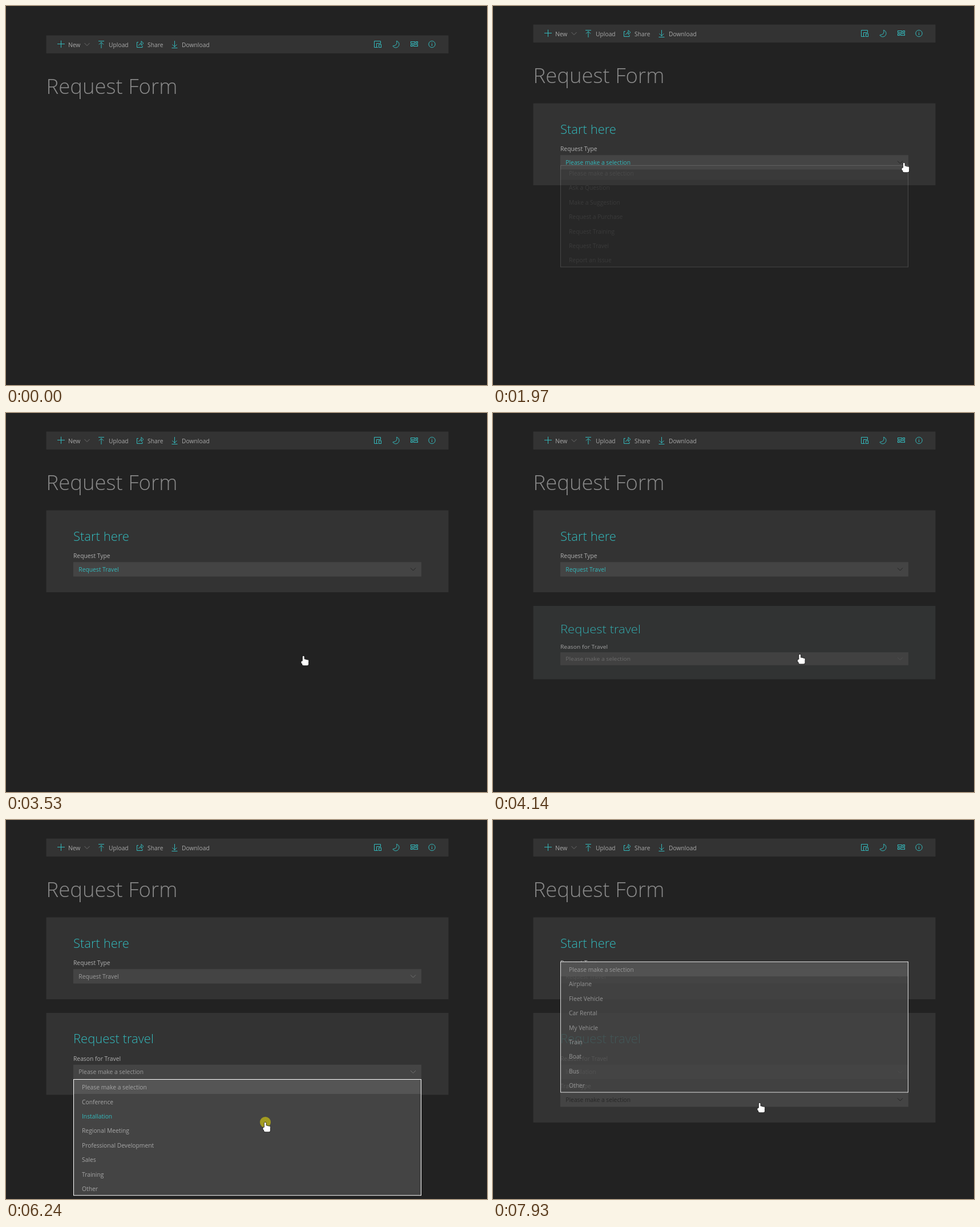
These frames come from a looping animation (843 px wide and 664 px high, 8000 ms). An HTML page with a canvas:

```html
<!DOCTYPE html>
<html lang="en">
<head>
<meta charset="utf-8">
<title>Request Form</title>
<style>
html, body { margin: 0; width: 843px; height: 664px; overflow: hidden; background: #222; }
canvas { display: block; }
</style>
</head>
<body>
<canvas id="stage" width="843" height="664"></canvas>
<script>
const ctx = document.getElementById('stage').getContext('2d');
const LOOP = 8000, ROW = 25.4, LEFT = 118, WIDTH = 610, FIELD_HEIGHT = 25.3;
const TEAL = '#33b9bc', LABEL = '#b0b0b0';
const FONT = '"Open Sans", "Noto Sans", sans-serif';
const PROMPT = 'Please make a selection';

// Each visit: the pointer travels to x, y, presses and releases.
// Visits alternate between opening a menu and choosing from it.
const visits = [
  { from: 940, to: 1570, press: 1740, release: 1960, x: 720.5, y: 274.5 },
  { from: 2130, to: 2820, press: 3280, release: 3450, x: 521.5, y: 425.5 },
  { from: 3690, to: 4450, press: 4530, release: 4740, x: 542, y: 436.5 },
  { from: 5270, to: 5770, press: 6240, release: 6470, x: 454.5, y: 529.5 },
  { from: 7100, to: 7470, press: 7620, release: 7840, x: 467.5, y: 495.5 }
];
const menus = [
  { top: 287, slide: -9, items: [PROMPT, 'Ask a Question', 'Make a Suggestion',
    'Request a Purchase', 'Request Training', 'Request Travel', 'Report an Issue'] },
  { top: 454.5, slide: -9, items: [PROMPT, 'Conference', 'Installation', 'Regional Meeting',
    'Professional Development', 'Sales', 'Training', 'Other'] },
  { top: 247, slide: 9, items: [PROMPT, 'Airplane', 'Fleet Vehicle', 'Car Rental',
    'My Vehicle', 'Train', 'Boat', 'Bus', 'Other'] }
];

const clamp = v => Math.max(0, Math.min(1, v));
const progress = (t, start, length) => clamp((t - start) / length);
const easeOut = v => 1 - (1 - v) ** 3;
const between = (t, a, b) => t >= a && t < b;

function text(str, x, y, size, color, weight = 400) {
  ctx.font = `${weight} ${size}px ${FONT}`;
  ctx.fillStyle = color;
  ctx.fillText(str, x, y);
}

function box(x, y, w, h, color) {
  ctx.fillStyle = color;
  ctx.fillRect(x, y, w, h);
}

// Runs drawing code with the origin moved to x, y
function at(x, y, paint) {
  ctx.save();
  ctx.translate(x, y);
  paint();
  ctx.restore();
}

function line(...points) {
  ctx.beginPath();
  points.forEach(([x, y]) => ctx.lineTo(x, y));
  ctx.stroke();
}

function chevron(x, y, color) {
  ctx.strokeStyle = color;
  ctx.lineWidth = 1;
  line([x - 4.5, y - 2.2], [x, y + 2.3], [x + 4.5, y - 2.2]);
}

// Arrow toward dir (1 down, -1 up) with a bar; the bar sits at the given end
function arrow(x, dir, barY) {
  at(x, 48.5, () => {
    const tip = dir > 0 ? 4 : -4, tail = -dir * 6.5;
    line([0, tail], [0, tip]);
    line([-4, tip - dir * 4], [0, tip], [4, tip - dir * 4]);
    line([-5, barY], [5, barY]);
  });
}

function shareIcon() {
  line([232, 44.5], [229.5, 44.5], [229.5, 53.5], [239, 53.5], [239, 50.5]);
  ctx.beginPath();
  ctx.arc(238, 52.5, 6, Math.PI * 1.1, Math.PI * 1.45);
  ctx.stroke();
  line([237, 42.5], [241, 46.3], [237, 50], [237, 42.5]);
}

function moonIcon() {
  ctx.beginPath();
  ctx.arc(683, 48, 6, -1.3, 2.6);
  ctx.quadraticCurveTo(687, 50, 684.6, 42.2);
  ctx.stroke();
}

function toolbar() {
  box(70.5, 32.5, 705, 31.5, '#333');
  ctx.strokeStyle = TEAL;
  ctx.lineWidth = 1;
  line([90, 47.5], [103, 47.5]);
  line([96.5, 41.5], [96.5, 54]);
  arrow(167, -1, -6);
  arrow(295.5, 1, 6);
  shareIcon();
  moonIcon();
  line([652, 53.5], [645.5, 53.5], [645.5, 42.5], [656.5, 42.5], [656.5, 47]);
  line([649.5, 53.5], [649.5, 46.5], [656.5, 46.5]);
  ctx.strokeRect(653.5, 48.5, 4, 5);
  [7, 3].forEach((w, row) => {
    const y = 43.5 + row * 5;
    ctx.strokeRect(709.5, y, w, 3);
    ctx.strokeRect(711.5 + w, y, 10 - w, 3);
  });
  ctx.beginPath();
  ctx.arc(746.5, 48, 5.7, 0, 7);
  ctx.stroke();
  line([746.5, 45], [746.5, 46]);
  line([746.5, 47.2], [746.5, 51]);

  chevron(142, 48.2, '#6c6c6c');
  ['New', 'Upload', 'Share', 'Download']
    .forEach((name, i) => text(name, [109, 180, 248, 308][i], 53, 10.3, '#a8a8a8'));
}

// Field i is opened by visit 2i, filled by the next one and left at the one after
function field(t, i, y, label) {
  const [opening, choosing, leaving] = visits.slice(2 * i);
  const chosen = choosing && t >= choosing.release;
  const focused = choosing && (between(t, opening.press, choosing.from) ||
    between(t, choosing.release, leaving.press));
  const hovered = !choosing || t < choosing.from;
  const hover = hovered ? progress(t, opening.to - 400, 250) : 0;
  const gray = (light, dark) => `rgb(${Array(3).fill(light + (dark - light) * hover)})`;

  text(label, LEFT, y - 7, 10.3, LABEL);
  box(LEFT, y, WIDTH, FIELD_HEIGHT, '#444');
  text(chosen ? menus[i].items[[5, 2][i]] : PROMPT, 127.3, y + 16.3, 10.3,
    focused ? TEAL : gray(156, 38));
  chevron(713.5, y + 12.5, focused ? '#222' : gray(112, 34));
}

function card(top, height, grow, title, drawFields) {
  if (grow <= 0) return;
  at(0, top, () => {
    ctx.globalAlpha = grow;
    ctx.scale(1, grow);
    box(70.5, 0, 705, height, '#333');
    box(70.5, 0, 705, height, `rgba(51, 185, 188, ${.08 * (1 - grow)})`);
    text(title, LEFT, 53.2, 22, TEAL, 300);
    drawFields();
  });
}

function menu(t, { top, slide, items }, i, pointerY) {
  const open = visits[2 * i].release;
  const close = visits[2 * i + 1]?.release ?? LOOP;
  if (!between(t, open, close)) return;
  const shown = easeOut(progress(t, open, 200));
  const hovered = Math.floor((pointerY - top) / ROW);
  at(LEFT, top + slide * (1 - shown), () => {
    ctx.globalAlpha = shown;
    box(0, 0, WIDTH, items.length * ROW, '#444');
    box(0, 0, WIDTH, ROW, '#555');
    items.forEach((item, n) =>
      text(item, 15, 17.6 + n * ROW, 10.3, n === hovered ? TEAL : '#a6a6a6'));
    ctx.strokeStyle = '#fff';
    ctx.lineWidth = 1;
    ctx.strokeRect(.5, 0, WIDTH - 1, items.length * ROW);
  });
}

// Every move slows down toward its goal and bows slightly upward
function pointerAt(t) {
  let x = 850, y = 292;
  for (const v of visits) {
    const k = Math.sin(progress(t, v.from, v.to - v.from) * Math.PI / 2);
    x += (v.x - x) * k;
    y += (v.y - y) * k - 20 * Math.sin(Math.PI * k);
    if (k < 1) break;
  }
  return [x, y];
}

function hand() {
  ctx.beginPath();
  for (let finger = 0; finger < 4; finger++) {
    const tip = finger ? 5 + finger * .7 : .3;
    ctx.roundRect(-1.6 + finger * 2.5, tip, 2.8, 12 - tip, 1.4);
  }
  ctx.roundRect(-4, 9, 4, 4.5, 1.5);
  ctx.roundRect(-2.4, 9.5, 11, 7.3, 2.5);
  ctx.lineWidth = 1.4;
  ctx.strokeStyle = '#1a1a1a';
  ctx.stroke();
  ctx.fillStyle = '#fff';
  ctx.fill();
}

function draw(t) {
  const [x, y] = pointerAt(t);
  box(0, 0, 843, 664, '#222');

  at(0, 19 * (1 - easeOut(progress(t, 140, 360))), () => {
    toolbar();
    text('Request Form', 70.5, 135, 36.5, '#8a8a8a', 300);
    card(170.5, 143.5, easeOut(progress(t, 140, 1325)), 'Start here',
      () => field(t, 0, 90.7, 'Request Type'));

    const extended = t >= visits[3].release;
    card(338, extended ? 192 : 143.5, easeOut(progress(t, 3691, 850)), 'Request travel', () => {
      field(t, 1, 90.7, 'Reason for Travel');
      if (extended) field(t, 2, 139.2, 'Travel Type');
    });
  });

  menus.forEach((m, i) => menu(t, m, i, y));

  if (visits.some(v => between(t, v.press, v.release))) {
    ctx.fillStyle = '#a29b20';
    ctx.beginPath();
    ctx.arc(x, y, 9.5, 0, 7);
    ctx.fill();
  }
  if (t > visits[0].from) at(x, y, hand);
}

const begin = performance.now();
function tick() {
  draw((performance.now() - begin) % LOOP);
  requestAnimationFrame(tick);
}
tick();
</script>
</body>
</html>
```
